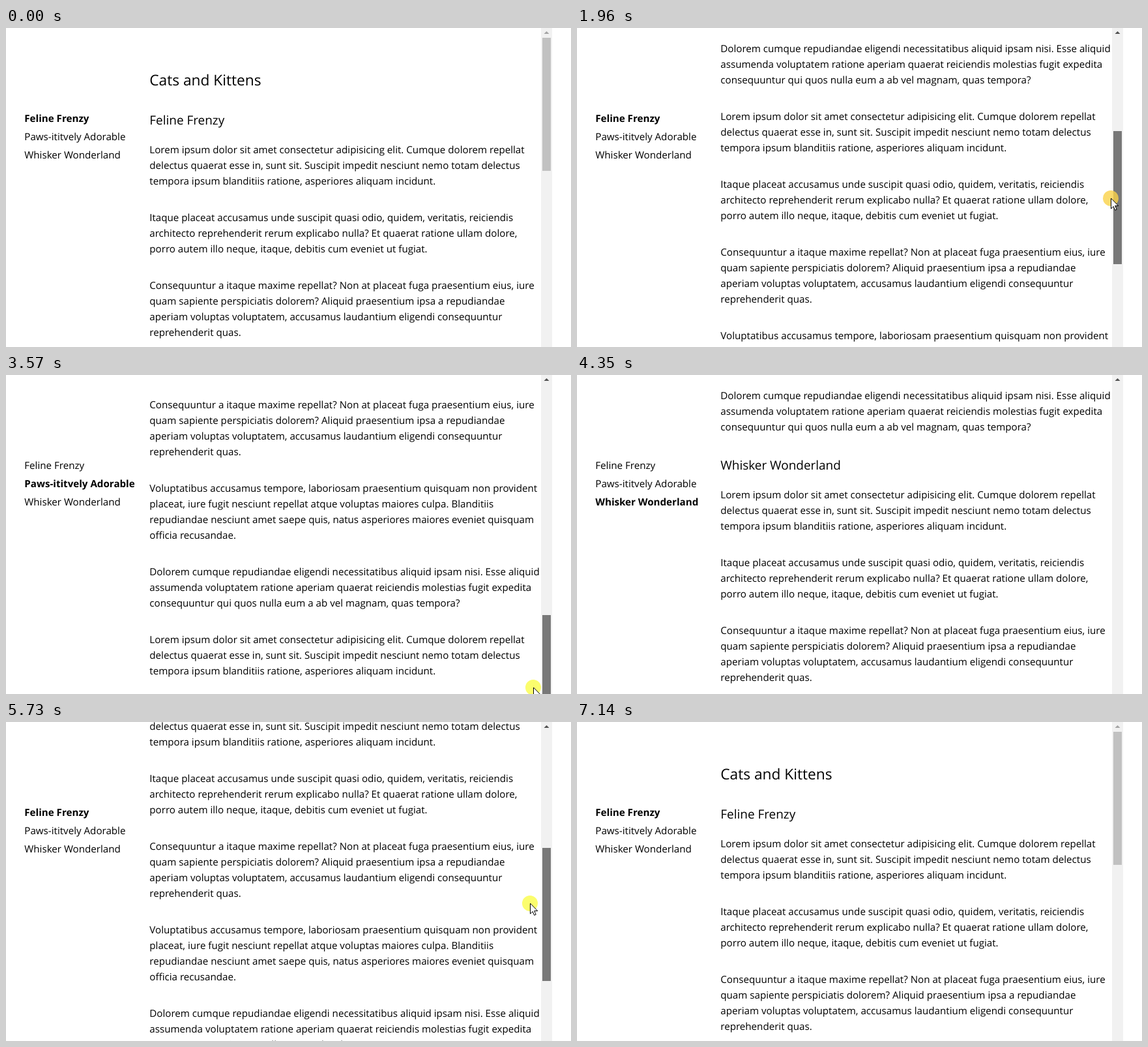
These frames come from a looping animation (867 px wide and 489 px high, 7450 ms). An HTML page:

```html
<!DOCTYPE html>
<html lang="en">
<head>
<meta charset="utf-8">
<title>Cats and Kittens</title>
<style>
  html, body { margin: 0; width: 100%; height: 100%; overflow: hidden; background: #fff; }
  svg { display: block; width: 867px; height: 489px; }
  text { font: 15.15px "Open Sans", "Noto Sans", sans-serif; text-rendering: geometricPrecision; }
  .title { font-size: 22.7px; }
  .heading { font-size: 18.95px; }
  .active { font-weight: 700; }
</style>
</head>
<body>
<svg viewBox="0 0 867 489">
  <g id="page"></g>
  <g id="nav"></g>
  <rect x="821" width="17" height="489" fill="#f1f1f1"/>
  <path id="arrow" d="M825.5 9h8l-4-4z"/>
  <rect id="thumb" x="823" y="15" width="13" height="204"/>
  <g id="cursor">
    <circle id="halo" r="12" fill-opacity=".8"/>
    <path d="M.5 0v16l3.7-3.5 2.5 5.8 2.5-1.1-2.5-5.6h5.1z" fill="#fff" stroke="#000"/>
  </g>
</svg>
<script>
const LOOP = 7450;
const THUMB_RATIO = 0.2304;
const SECTION_HEIGHT = 1184;
const byId = id => document.getElementById(id);
const [page, nav, arrow, thumb, cursor, halo] =
  ['page', 'nav', 'arrow', 'thumb', 'cursor', 'halo'].map(byId);

const paragraphs = [
  ['Lorem ipsum dolor sit amet consectetur adipisicing elit. Cumque dolorem repellat',
   'delectus quaerat esse in, sunt sit. Suscipit impedit nesciunt nemo totam delectus',
   'tempora ipsum blanditiis ratione, asperiores aliquam incidunt.'],
  ['Itaque placeat accusamus unde suscipit quasi odio, quidem, veritatis, reiciendis',
   'architecto reprehenderit rerum explicabo nulla? Et quaerat ratione ullam dolore,',
   'porro autem illo neque, itaque, debitis cum eveniet ut fugiat.'],
  ['Consequuntur a itaque maxime repellat? Non at placeat fuga praesentium eius, iure',
   'quam sapiente perspiciatis dolorem? Aliquid praesentium ipsa a repudiandae',
   'aperiam voluptas voluptatem, accusamus laudantium eligendi consequuntur',
   'reprehenderit quas.'],
  ['Voluptatibus accusamus tempore, laboriosam praesentium quisquam non provident',
   'placeat, iure fugit nesciunt repellat atque voluptas maiores culpa. Blanditiis',
   'repudiandae nesciunt amet saepe quis, natus asperiores maiores eveniet quisquam',
   'officia recusandae.'],
  ['Dolorem cumque repudiandae eligendi necessitatibus aliquid ipsam nisi. Esse aliquid',
   'assumenda voluptatem ratione aperiam quaerat reiciendis molestias fugit expedita',
   'consequuntur qui quos nulla eum a ab vel magnam, quas tempora?']
];

function addText(parent, x, y, content, className = '') {
  const node = document.createElementNS('http://www.w3.org/2000/svg', 'text');
  node.setAttribute('x', x);
  node.setAttribute('y', y);
  node.setAttribute('class', className);
  node.textContent = content;
  parent.append(node);
  return node;
}

addText(page, 220.3, 88, 'Cats and Kittens', 'title');
['Feline Frenzy', 'Paws-itively Adorable', 'Whisker Wonderland'].forEach((name, i) => {
  const top = i * SECTION_HEIGHT;
  addText(page, 220.3, top + 148, name, 'heading');
  let y = top + 192;
  for (const lines of [...paragraphs, ...paragraphs]) {
    for (const line of lines) {
      addText(page, 220.3, y, line);
      y += 24;
    }
    y += 32;
  }
});
const links = ['Feline Frenzy', 'Paws-ititvely Adorable', 'Whisker Wonderland']
  .map((name, i) => addText(nav, 28.3, 144 + 28 * i, name));

// Monotone cubic interpolation through [time, value] keys.
function track(keys) {
  const slope = i => (keys[i + 1][1] - keys[i][1]) / (keys[i + 1][0] - keys[i][0]);
  const tangents = keys.map((_, i) => {
    if (i === 0 || i === keys.length - 1) return 0;
    const a = slope(i - 1), b = slope(i);
    return a * b > 0 ? 2 * a * b / (a + b) : 0;
  });
  return t => {
    if (t <= keys[0][0]) return keys[0][1];
    const i = keys.findIndex(key => key[0] > t) - 1;
    if (i < 0) return keys[keys.length - 1][1];
    const [t0, v0] = keys[i], [t1, v1] = keys[i + 1];
    const d = t1 - t0, u = (t - t0) / d, w = 1 - u;
    return w * w * ((1 + 2 * u) * v0 + u * d * tangents[i])
         + u * u * ((3 - 2 * u) * v1 - w * d * tangents[i + 1]);
  };
}

const scrollAt = track([[1150, 0], [1510, 74], [2450, 1143], [3180, 1143],
  [3570, 1532], [4340, 2371], [5140, 2371], [5730, 774], [6330, 0]]);
const pointerX = track([[900, 829], [1170, 829], [1510, 825], [2450, 816], [3180, 816],
  [3570, 809], [4340, 806], [5140, 802], [5730, 804], [6330, 829], [6640, 832], [6720, 836]]);
// Pointer height relative to the travel of the scrollbar thumb.
const grabAt = track([[180, 510], [920, 118], [1150, 118], [1510, 120], [2450, 117],
  [3180, 117], [3570, 126], [4340, 126], [5730, 100], [6330, 110], [6630, 110], [7130, 510]]);
const haloGreen = track([[900, 250], [1170, 185], [1510, 185], [2450, 238], [3180, 238], [3570, 252]]);

function draw(t) {
  const scroll = Math.round(scrollAt(t));
  const offset = scroll * THUMB_RATIO;
  const x = pointerX(t), y = offset + grabAt(t);

  page.setAttribute('transform', `translate(0 ${-scroll})`);
  const active = scroll > 950 + SECTION_HEIGHT ? 2 : scroll > 950 ? 1 : 0;
  links.forEach((link, i) => link.classList.toggle('active', i === active));

  const pressed = t >= 1150 && t < 6400;
  const hovered = y >= 15 + offset && y < 219 + offset;
  thumb.setAttribute('y', 15 + Math.round(offset));
  thumb.setAttribute('fill', pressed ? '#787878' : hovered ? '#a8a8a8' : '#c1c1c1');
  arrow.setAttribute('fill', scroll ? '#505050' : '#a3a3a3');

  halo.setAttribute('fill', `rgb(250 ${haloGreen(t)} 72)`);
  cursor.setAttribute('transform', `translate(${Math.round(x)} ${Math.round(y)})`);
}

function tick() {
  draw(performance.now() % LOOP);
  requestAnimationFrame(tick);
}
tick();
</script>
</body>
</html>
```
